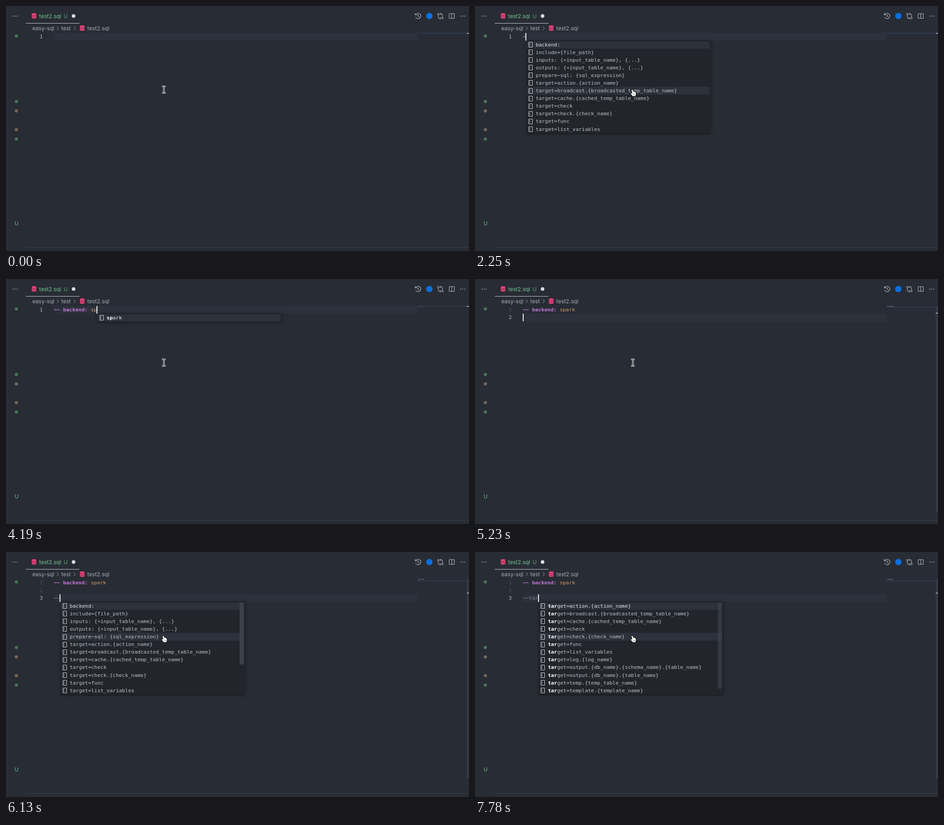
Recreate the animation shown at these times as an HTML page with a canvas. Size 1028x545 px, loop 8000 ms.

```html
<!DOCTYPE html>
<html lang="en">
<head>
<meta charset="utf-8">
<title>SQL editor completion</title>
<style>
html, body { margin: 0; width: 100%; height: 100%; overflow: hidden; background: #282c34; }
canvas { display: block; }
</style>
</head>
<body>
<canvas id="stage" width="1028" height="545"></canvas>
<script>
const ctx = document.getElementById('stage').getContext('2d');
const LOOP = 8000, ROW = 17.06, CHAR = 6.83, TOP = 60, LEFT = 106.2;
const MONO = '11.35px "DejaVu Sans Mono", monospace';
const SANS = '12.1px Inter, sans-serif';
const C = {
  bg: '#282c34', line: '#2c313c', popup: '#22262c', border: '#16181c', text: '#bbc0c8',
  green: '#73c991', purple: '#c678dd', orange: '#d19a66', grey: '#7f848e',
  dim: '#495162', icon: '#c3c6cc', pink: '#f5437c', crumb: '#a8adb6'
};

const targets = [
  'target=action.{action_name}', 'target=broadcast.{broadcasted_temp_table_name}',
  'target=cache.{cached_temp_table_name}', 'target=check', 'target=check.{check_name}',
  'target=func', 'target=list_variables', 'target=log.{log_name}',
  'target=output.{db_name}.{schema_name}.{table_name}', 'target=output.{db_name}.{table_name}',
  'target=temp.{temp_table_name}', 'target=template.{template_name}'
];
const all = [
  'backend:', 'include={file_path}', 'inputs: {*input_table_name}, {...}',
  'outputs: {*input_table_name}, {...}', 'prepare-sql: {sql_expression}', ...targets.slice(0, 7)
];
const backends = ['spark', 'postgres', 'clickhouse', 'flink', 'sqlite'];

// time, caret shown, active line, typed text, popup items, popup scrollbar opacity, matched letters
const steps = [
  [0, 0, 1, ''], [450, 1, 1, ''], [900, 0, 1, ''], [1350, 1, 1, ''], [1950, 0, 1, ''],
  [2250, 1, 1, '-', all, 0], [2400, 1, 1, '--', all, 0.5],
  [2550, 1, 1, '--', all, 1], [2850, 0, 1, '--', all, 1],
  [3300, 1, 1, '-- backend:'], [3750, 0, 1, '-- backend:'],
  [4050, 1, 1, '-- backend: ', backends, 0], [4190, 1, 1, '-- backend: sp', ['spark'], 0, 2],
  [4640, 1, 1, '-- backend: spark'], [5090, 1, 2, ''], [5530, 1, 3, ''],
  [5830, 1, 3, '-', all, 0], [5980, 1, 3, '--', all, 0.5],
  [6130, 1, 3, '--', all, 1], [6430, 0, 3, '--', all, 1],
  [7030, 1, 3, '--', all, 1], [7480, 0, 3, '--', all, 1],
  [7630, 1, 3, '--t', targets, 0.4, 1], [7780, 1, 3, '--tar', targets, 0.7, 3]
];

function rect(x, y, w, h, color) {
  ctx.fillStyle = color;
  ctx.fillRect(x, y, w, h);
}
function dot(x, y, r, color) {
  ctx.fillStyle = color;
  ctx.beginPath();
  ctx.arc(x, y, r, 0, Math.PI * 2);
  ctx.fill();
}
function label(s, x, y, color, font = SANS) {
  ctx.font = font;
  ctx.fillStyle = color;
  ctx.fillText(s, x, y);
}
// Math glyphs stand for the editor font's long hyphen and centred asterisk.
function mono(s, x, y, color, bold) {
  const glyphs = s.replace(/-/g, '\u2212').replace(/\*/g, '\u2217');
  label(glyphs, x, y, color, (bold ? 'bold ' : '') + MONO);
}
function stroke(d, color = C.icon, width = 1) {
  ctx.strokeStyle = color;
  ctx.lineWidth = width;
  ctx.stroke(new Path2D(d));
}
function at(x, y, draw) {
  ctx.save();
  ctx.translate(x, y);
  draw();
  ctx.restore();
}

function database(x, y) {
  at(x, y, () => {
    ctx.fillStyle = C.pink;
    ctx.fill(new Path2D('M-5.2-4A5.2 2 0 0 1 5.2-4V3.8A5.2 2.1 0 0 1-5.2 3.8Z'));
    stroke('M-5.4-3A5.4 2 0 0 0 5.4-3M-5.4 .7A5.4 2 0 0 0 5.4 .7', C.bg, 0.9);
  });
}
function ellipsis(x, y) {
  for (const d of [-4.5, 0, 4.5]) dot(x + d, y, 0.9, C.icon);
}

function toolbar() {
  at(915, 22, () => stroke('M-5.3-2.6A6 6 0 1 1-5.5 2.6M-6.2-6V-2.4H-2.6M0-3.5V.5L3 2.4', C.icon, 1.1));
  dot(940, 22.3, 7, '#0b6fdc');
  at(964.5, 22.5, () => stroke(
    'M-4.5-2.2V3.5Q-4.5 5 -3 5H1M-1.2 2.8L1 5L-1.2 7.2M4.5 2.2V-3.5Q4.5-5 3-5H-1M1.2-7.2L-1-5L1.2-2.8' +
    'M-6.4-4.2a1.9 1.9 0 1 0 3.8 0a1.9 1.9 0 1 0-3.8 0M2.6 4.2a1.9 1.9 0 1 0 3.8 0a1.9 1.9 0 1 0-3.8 0'));
  stroke('M984 17H995.5V27.5H984ZM989.7 17V27.5');
  ellipsis(1014, 22.5);
}

function frame() {
  rect(0, 0, 1028, 545, C.bg);
  ellipsis(20.5, 22.5);
  database(62.3, 22);
  label('test2.sql', 73.6, 26.8, C.green);
  label('U', 128, 26.6, '#5da779');
  dot(150, 22.3, 4, '#d9dbdf');
  rect(44, 38, 119, 1, '#c9ccd1');
  toolbar();

  label('easy-sql', 58.4, 53.8, C.crumb);
  label('test', 122.8, 53.8, C.crumb);
  label('test2.sql', 180.6, 53.8, C.crumb);
  for (const x of [113, 150.5]) stroke(`M${x} 45.5L${x + 4} 49.5L${x} 53.5`, C.crumb);
  database(169.2, 49.3);

  for (const y of [66.5, 212.3, 296]) dot(23, y, 3.6, '#4a7559');
  for (const y of [233.3, 275]) dot(23, y, 3.6, '#75675a');
  label('U', 19, 488, '#5da779', '500 ' + SANS);
  rect(44, 536.5, 984, 1, '#3b404b');
}

function code(s, y) {
  if (!s.startsWith('-- ')) return mono(s, LEFT, y, s === '-' ? C.text : C.grey);
  mono(s.slice(0, 11), LEFT, y, C.purple, true);
  mono(s.slice(12), LEFT + 12 * CHAR, y, C.orange);
}

function minimap(n, chars) {
  if (chars > 3) {
    ctx.globalAlpha = 0.6;
    rect(915, 60, Math.min(chars, 11) - 3, 1.3, C.purple);
    if (chars > 12) rect(924, 60, chars - 12, 1.3, C.orange);
    ctx.globalAlpha = 1;
  }
  const x = n > 2 ? 912 : 914;
  rect(x, 58 + 2 * n, (n > 1 ? 1022 : 1028) - x, 1, '#2d4a6c');
}

function scrollbar(n, t) {
  if (n > 1 && t >= 5230) rect(1023, TOP, 5, 476 * 476 / (476 + (n - 1) * ROW), '#343944');
  rect(1023, 60 + (n - 1) * 15.3, 5, 1.5, '#c4c7cc');
}

function snippetIcon(x, y) {
  at(Math.round(x) + 0.5, Math.round(y) + 0.5, () => {
    stroke('M0 0H8V11H0Z', '#d6d9dd', 1);
    stroke('M1 3H3M1 5.5H3.5M1 8H3', '#d6d9dd', 0.8);
  });
}

function popup(x, top, items, bar, matched = 0, hover = -1) {
  const h = items.length * ROW + 2.6, w = 409;
  ctx.save();
  ctx.shadowColor = 'rgba(0, 0, 0, 0.3)';
  ctx.shadowBlur = 8;
  ctx.shadowOffsetX = 2;
  rect(x, top, w, h, C.popup);
  ctx.restore();
  items.forEach((s, i) => {
    const y = top + 0.6 + i * ROW;
    if (i === 0 || i === hover) rect(x + 1, y, w - 2, ROW, i ? '#2d313b' : '#2c313a');
    snippetIcon(x + 5.5, y + 2.6);
    const tx = x + 21.3, base = y + 12.3;
    mono(s.slice(0, matched), tx, base, '#fff', true);
    mono(s.slice(matched), tx + matched * CHAR, base, i ? C.text : '#e6e8eb');
  });
  rect(x, top, w, 1, C.border);
  rect(x, top + h - 1, w, 1, C.border);
  if (bar) {
    ctx.globalAlpha = bar;
    rect(x + w - 10.5, top + 1, 9.5, items === all ? 138 : 192, '#3d414b');
    ctx.globalAlpha = 1;
  }
}

function pointer(hand) {
  ctx.lineJoin = 'round';
  if (hand) {
    at(351, 193, () => {
      const d = 'M-3.4-5.8C-2.6-7-1.2-6.4-.8-5.4L.4-2.2Q1.6-3.2 2.4-1.9Q3.8-2.6 4.3-1.1Q5.8-1.4 6 .5L6.2 3.4L5 7.4H-.8L-4.4 3.2C-5.6 1.4-4.2 .5-2.6 1.6L-1.7 2.1Z';
      stroke(d, '#111', 1.8);
      ctx.fillStyle = '#fff';
      ctx.fill(new Path2D(d));
      stroke('M1.2 2.4V5.2M3.2 2.4V5.2', '#333', 0.7);
    });
  } else {
    at(350.5, 186, () => {
      const d = 'M-4-7.2H-2Q0-7.2 0-5.2Q0-7.2 2-7.2H4M0-5.2V5.2M-4 7.2H-2Q0 7.2 0 5.2Q0 7.2 2 7.2H4M-2 1.5H2';
      stroke(d, '#f4f4f4', 3);
      stroke(d, '#15171b', 1);
    });
  }
  ctx.lineJoin = 'miter';
}

function draw(t) {
  const [time, caret, n, typed, items, bar, matched] = steps.filter(s => s[0] <= t).pop();
  const y = TOP + (n - 1) * ROW;
  frame();
  rect(106, y, 808, ROW, C.line);
  for (let i = 1; i <= n; i++) {
    mono(String(i), 74.8, TOP + (i - 1) * ROW + 12.3, i === n ? '#b9bec8' : C.dim);
  }
  const first = '-- backend: spark';
  if (n > 1) code(first, TOP + 12.3);
  code(typed, y + 12.3);
  minimap(n, n > 1 ? first.length : typed.length);
  scrollbar(n, t);

  const top = y + ROW - 0.1, long = items && items.length > 5;
  if (items) {
    const hover = long && time !== 5830 ? Math.floor((188 - top) / ROW) : -1;
    popup(LEFT + typed.length * CHAR + 0.3, top, items, bar, matched, hover);
  }
  if (caret) rect(Math.round(105.6 + typed.length * 6.8), y, 2, ROW, '#eef0f3');
  pointer(long);
}

const start = performance.now();
function tick() {
  draw((performance.now() - start) % LOOP);
  requestAnimationFrame(tick);
}
tick();
</script>
</body>
</html>
```
